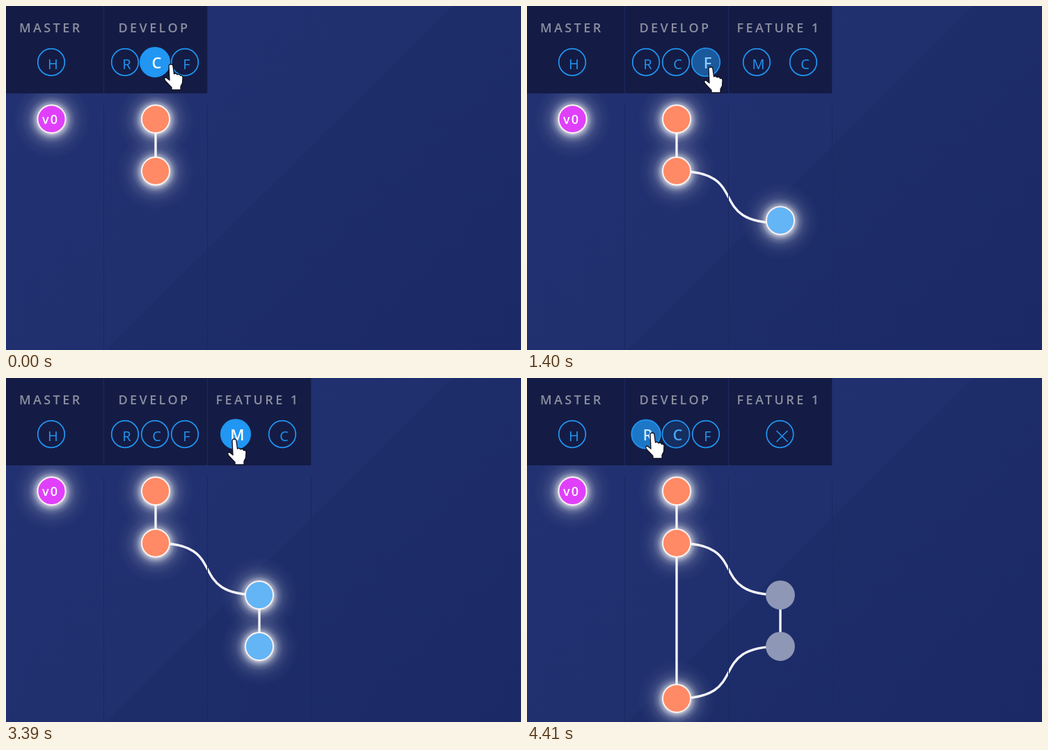
An HTML page for the animation above (4510 ms loop, 740 px wide and 496 px high).

```html
<!DOCTYPE html>
<html lang="en">
<head>
<meta charset="utf-8">
<title>Branch graph</title>
<style>
  html, body { margin: 0; width: 100%; height: 100%; overflow: hidden; background: #1d2c69; }
  svg { display: block; width: 740px; height: 496px; font-family: "Open Sans", "Noto Sans", sans-serif; }
  .title { font-size: 18px; font-weight: 600; letter-spacing: 3.4px; fill: #8b8f9f; }
  .tag { font-size: 18px; font-weight: 600; letter-spacing: 2px; fill: #fff; }
  .link { fill: none; stroke: #f3f3fa; stroke-width: 3.4; }
</style>
</head>
<body>
<svg viewBox="0 0 740 496">
  <defs>
    <linearGradient id="sky" gradientUnits="userSpaceOnUse" x1="0" y1="0" x2="618" y2="618">
      <stop offset="0" stop-color="#223172"/>
      <stop offset=".517" stop-color="#202f6e"/>
      <stop offset=".519" stop-color="#1d2d6a"/>
      <stop offset="1" stop-color="#1b2a67"/>
    </linearGradient>
    <radialGradient id="halo">
      <stop offset=".34" stop-color="#fff" stop-opacity=".8"/>
      <stop offset=".41" stop-color="#fff" stop-opacity=".52"/>
      <stop offset=".5" stop-color="#fff" stop-opacity=".27"/>
      <stop offset=".61" stop-color="#fff" stop-opacity=".12"/>
      <stop offset=".78" stop-color="#fff" stop-opacity=".04"/>
      <stop offset="1" stop-color="#fff" stop-opacity="0"/>
    </radialGradient>
    <filter id="soft" x="-50%" y="-50%" width="200%" height="200%" filterUnits="userSpaceOnUse">
      <feGaussianBlur stdDeviation="1.6"/>
    </filter>
  </defs>
  <rect width="740" height="496" fill="url(#sky)"/>
  <g id="scene"></g>
</svg>
<script>
const LOOP = 4510;
const STEPS = [0, 120, 240, 670, 790, 950, 1100, 1250, 1400, 1540, 1690, 1820, 1970, 2120, 2270,
  2420, 2570, 2690, 2820, 2970, 3110, 3390, 3540, 3670, 3790, 3900, 4020, 4140, 4290, 4410];

// time, x, y, shape
const CURSOR = [
  [0, 237, 85, 'hand'], [120, 244, 85, 'hand'], [240, 250, 85, 'hand'],
  [1400, 264, 89, 'hand'], [1540, 288, 98, 'arrow'], [1690, 318, 104, 'arrow'],
  [1820, 362, 101, 'arrow'], [1970, 388, 88, 'hand'], [2120, 390, 89, 'hand'],
  [2570, 374, 101, 'arrow'], [2690, 340, 101, 'arrow'], [2820, 332, 94, 'hand'],
  [2970, 330, 91, 'hand'], [3110, 328, 89, 'hand'], [3670, 326, 98, 'arrow'],
  [3790, 325, 104, 'arrow'], [4140, 272, 101, 'arrow'], [4290, 212, 88, 'hand'],
  [4410, 180, 80, 'hand']
];

// time, hover amount
const HOVER = {
  release: [[0, 0], [4410, .75]],
  commit: [[0, 1], [120, .5], [240, 0], [4290, .6], [4410, .15]],
  feature: [[0, 0], [120, .5], [240, 1], [1400, .5], [1540, 0]],
  merge: [[0, 0], [2820, .5], [2970, 1]],
  featureCommit: [[0, 0], [1970, .06], [2120, 1], [2570, .5], [2690, .06], [2820, 0]]
};

const SHAPES = {
  hand: 'M-3 2Q-3-1 0-1Q3-1 3 2L4.5 13Q7 11 9 14Q12 12 13.500 15.500Q17 14.500 17 18.500L16.500 26L14 31V36H1V32.500L-8 23Q-11 18-7 18L-2 22Z',
  arrow: 'M0 0V24L5.5 19L9.5 28.500L13.500 27L9.5 17.500H16Z'
};

const ORANGE = [255, 138, 101], BLUE = [100, 181, 246], PINK = [224, 64, 251];
const GREY = [143, 151, 182], ACCENT = [33, 150, 243], WHITE = [255, 255, 255];

const clamp = v => Math.min(1, Math.max(0, v));
const ramp = (t, start, length) => clamp((t - start) / length);
const swing = u => (1 - Math.cos(Math.PI * u)) / 2;
const latest = (rows, t) => rows.filter(row => row[0] <= t).pop();
const mix = (a, b, k) => `rgb(${a.map((v, i) => Math.round(v + (b[i] - v) * k))})`;
const fade = (alpha, body) => alpha > 0 ? `<g opacity="${alpha}">${body}</g>` : '';

function halo({ x, y, alpha = 1, merged = 0 }) {
  return fade(alpha * (1 - merged), `<circle cx="${x}" cy="${y + 1}" r="56" fill="url(#halo)"/>`);
}

function disc({ x, y, color, alpha = 1, merged = 0 }) {
  const fill = mix(color, GREY, merged);
  return fade(alpha, `<circle cx="${x}" cy="${y}" r="20" fill="${fill}"
    stroke="${mix([255, 244, 242], GREY, merged)}" stroke-width="1.8"/>`);
}

function link(path, progress = 1) {
  return progress > 0
    ? `<path class="link" d="${path}" pathLength="1" stroke-dasharray="${progress} 2"/>` : '';
}

const bend = (x1, y1, x2, y2) => {
  const pull = Math.sign(x2 - x1) * 110;
  return `M${x1} ${y1}C${x1 + pull} ${y1} ${x2 - pull} ${y2} ${x2} ${y2}`;
};

// Nearby nodes flow together into a white capsule.
function bridge(x, y1, y2, alpha) {
  const gap = y2 - y1;
  return fade(alpha * ramp(-gap, -64, 18), `<path d="M${x} ${y1 + 3}V${y2 - 3}" stroke="#fff"
    stroke-linecap="round" stroke-width="${42 + Math.min(6, gap / 6)}" filter="url(#soft)"/>`);
}

function button(x, label, hover = 0) {
  const active = hover > 0;
  return `<circle cx="${x}" cy="81" r="${19.300 + 1.9 * hover}" fill="rgb(${ACCENT})"
    fill-opacity="${hover}" stroke="rgb(${ACCENT})" stroke-width="1.7"/>
    <text x="${x + 2.5}" y="${active ? 90 : 91}" text-anchor="middle" font-size="${active ? 22 : 20}"
    font-weight="${active ? 600 : 400}" fill="${mix(ACCENT, WHITE, hover)}">${label}</text>`;
}

const closeButton = x => button(x, '') +
  `<path d="M${x - 5} 76l16 16m0-16l-16 16" stroke="rgb(${ACCENT})" stroke-width="1.5"/>`;

const header = (x, width, textX, title) =>
  `<rect x="${x}" width="${width}" height="126" fill="#141c45"/><text class="title" x="${textX}" y="38">${title}</text>`;

const divider = x => `<path d="M${x} 0V126" stroke="#1d2a62"/><path d="M${x} 143V496" stroke="#1a2960"/>`;

function cursor(t) {
  const [, x, y, shape] = latest(CURSOR, t);
  return `<path transform="translate(${x} ${y})" d="${SHAPES[shape]}" fill="#fff"
    stroke="#101020" stroke-width="1.3" stroke-linejoin="round"/>`;
}

function scene(t) {
  const hover = name => latest(HOVER[name], t)[1];
  const column = ramp(t, 730, 430);
  const merged = ramp(t, 3540, 250);
  const first = { x: 364, y: 238 + 75 * swing(ramp(t, 800, 700)), color: BLUE, alpha: ramp(t, 700, 200), merged };
  const second = { x: 364, y: 313 + 74 * swing(ramp(t, 2270, 800)), color: BLUE, alpha: ramp(t, 2200, 200), merged };
  const joined = { x: 215, y: 387 + 75 * swing(ramp(t, 3450, 780)), color: ORANGE, alpha: ramp(t, 3500, 150) };
  const nodes = [
    { x: 65.500, y: 163, color: PINK },
    { x: 215, y: 163, color: ORANGE },
    { x: 215, y: 238, color: ORANGE },
    first, second, joined
  ];

  return nodes.map(halo).join('') +
    link('M215 163V238') +
    link(bend(215, 238, 364, 313), ramp(t, 620, 400)) +
    link('M364 313V387', ramp(t, 2270, 700)) +
    link('M215 238V462', ramp(t, 3500, 400)) +
    link(bend(364, 387, 215, 462), ramp(t, 3540, 400)) +
    bridge(364, first.y, second.y, second.alpha * (1 - merged)) +
    divider(140.500) + divider(289.500) + fade(column, divider(438.500)) +
    nodes.map(disc).join('') +
    '<text class="tag" x="52" y="170">v0</text>' +
    header(0, 140, 19, 'MASTER') + button(65, 'H') +
    header(141, 148, 161.500, 'DEVELOP') +
    button(171, 'R', hover('release')) + button(214, 'C', hover('commit')) + button(257, 'F', hover('feature')) +
    fade(column, header(290, 148, 301.500, 'FEATURE 1') +
      fade(1 - merged, button(330, 'M', hover('merge')) + button(397, 'C', hover('featureCommit'))) +
      fade(merged, closeButton(363.500))) +
    cursor(t);
}

const root = document.getElementById('scene');
const begin = performance.now();
let shown = -1;

function tick() {
  const time = (performance.now() - begin) % LOOP;
  const step = STEPS.filter(s => s <= time).pop();
  if (step !== shown) root.innerHTML = scene(shown = step);
  requestAnimationFrame(tick);
}
tick();
</script>
</body>
</html>
```
